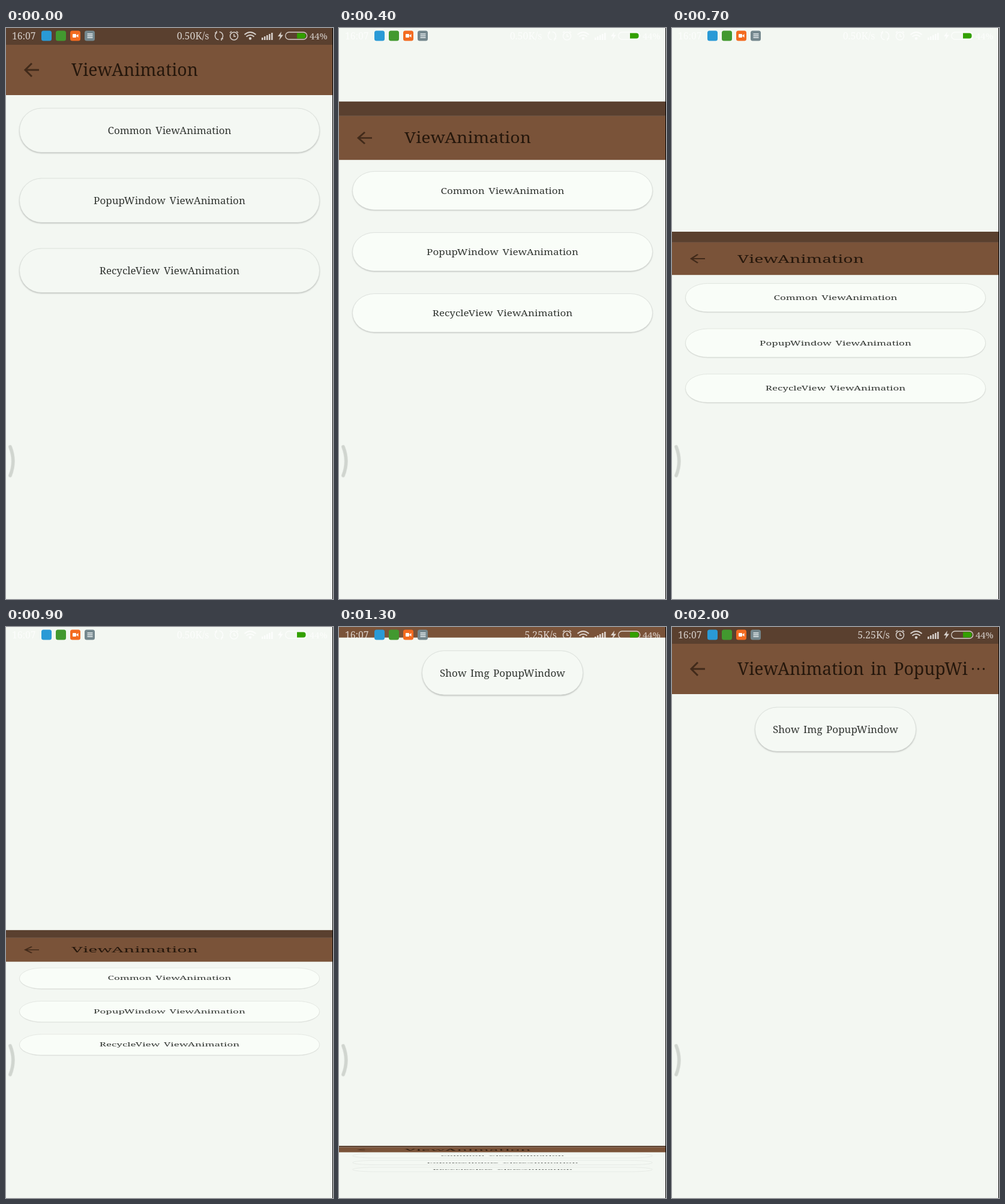
An HTML page with a canvas for the animation above (2.1 s loop, 545 by 953 pixels).

```html
<!DOCTYPE html>
<html lang="en">
<head>
<meta charset="utf-8">
<title>ViewAnimation</title>
<style>
html, body { margin: 0; width: 100%; height: 100%; overflow: hidden; background: #f3f7f2; }
canvas { display: block; }
</style>
</head>
<body>
<canvas id="stage" width="545" height="953"></canvas>
<script>
const ctx = document.getElementById('stage').getContext('2d');
const LOOP = 2100, STEP = 100, PAGE = 960;
const PAPER = '#f3f7f2', INK = 'rgba(255,255,255,.75)', TITLE = '#25170c';

// [time, linear progress] of the page change
const KEYS = [[0, 0], [400, .2325], [600, .35], [900, .517], [1100, .644], [1200, .741], [1500, .909], [1800, 1]];

function progress(time) {
  const i = KEYS.findIndex(k => k[0] > time);
  if (i < 0) return 1;
  const [t0, a] = KEYS[i - 1], [t1, b] = KEYS[i];
  const u = a + (b - a) * (time - t0) / (t1 - t0);
  return (1 - Math.cos(Math.PI * u)) / 2;
}

function rect(x, y, w, h, color) {
  ctx.fillStyle = color;
  ctx.fillRect(x, y, w, h);
}

function round(x, y, w, h, r, color) {
  ctx.beginPath();
  ctx.roundRect(x, y, w, h, r);
  ctx.fillStyle = color;
  ctx.fill();
}

function text(str, x, y, size, color, align = 'left') {
  ctx.font = `300 ${size}px "Noto Serif", "Liberation Serif", serif`;
  ctx.wordSpacing = size / 8 + 'px';
  ctx.textAlign = align;
  ctx.fillStyle = color;
  ctx.fillText(str, x, y);
}

function line(path, width, color) {
  ctx.lineWidth = width;
  ctx.strokeStyle = color;
  ctx.stroke(new Path2D(path));
}

function disc(x, y, r, color) {
  ctx.beginPath();
  ctx.arc(x, y, r, 0, 7);
  ctx.fillStyle = color;
  ctx.fill();
}

function button(label, x, y, w, fill) {
  const scale = ctx.getTransform().d; // canvas shadows ignore the transform
  ctx.save();
  ctx.shadowColor = `rgba(0,0,0,${.28 * scale})`;
  ctx.shadowBlur = 2.5 * scale;
  ctx.shadowOffsetY = 1.3 * scale;
  round(x, y, w, 73.5, 36.7, fill);
  ctx.restore();
  ctx.lineWidth = .8;
  ctx.strokeStyle = '#d9ddd8';
  ctx.stroke();
  text(label, x + w / 2, y + 43, 17, '#313531', 'center');
}

function header(title) {
  rect(0, 0, 545, PAGE, PAPER);
  rect(0, 0, 545, 28, '#5a402f');
  rect(0, 28, 545, 84, '#7a5339');
  line('M55 70H33M43 59L32 70L43 81', 3, '#412a1a');
  text(title, 109, 80, 28.4, TITLE);
}

function firstPage(fill) {
  header('ViewAnimation');
  ['Common', 'PopupWindow', 'RecycleView'].forEach((name, i) =>
    button(name + ' ViewAnimation', 22.5, 134 + 117 * i, 500, fill));
}

function secondPage() {
  header('ViewAnimation in PopupWi');
  for (let i = 0; i < 3; i++) disc(501.5 + 9 * i, 70, 1.7, TITLE);
  button('Show Img PopupWindow', 138.5, 134, 268, '#f5f9f4');
}

function statusBar(changed) {
  text('16:07', 10, 18.5, 15.7, INK);
  ['#2a9ad6', '#42992f', '#f36b20', '#74878d'].forEach((color, i) =>
    round(59 + 24 * i, 4.5, 17, 17, 3.5, color));
  round(111, 10, 6, 6, 1, '#fff');
  ctx.fillStyle = '#fff';
  ctx.fill(new Path2D('M117 13L120.5 10V16Z'));
  for (let y = 9; y < 17; y += 3) rect(135.5, y, 9, 2, '#cfd8da');

  if (changed) {
    text('5.25K/s', 363, 18.5, 16, INK, 'right');
  } else {
    text('0.50K/s', 338.5, 18.5, 16, INK, 'right');
    line('M354.5 19.5A6.5 6.5 0 0 1 351 7.9M355.5 6.5A6.5 6.5 0 0 1 359 18.1M351 5V8H348M359 21V18H362', 1.5, INK);
  }
  // alarm, wifi, signal, charging bolt
  line('M386.5 13.5A6.5 6.5 0 1 1 373.5 13.5A6.5 6.5 0 1 1 386.5 13.5M380 10V14H383M373 8L376 5.5M387 8L384 5.5', 1.5, INK);
  line('M397.5 11Q407 3 416.5 11M400.5 14.5Q407 9 413.5 14.5', 2, INK);
  disc(407, 17.5, 2.2, INK);
  for (let i = 0; i < 5; i++) rect(426 + 4 * i, 16 - 2 * i, 2.6, 4 + 2 * i, INK);
  ctx.fillStyle = INK;
  ctx.fill(new Path2D('M459 6L453 14H457L455 20.5L462 11.5H458Z'));
  ctx.beginPath();
  ctx.roundRect(465.7, 7, 36, 12, 6);
  ctx.lineWidth = 1.3;
  ctx.strokeStyle = INK;
  ctx.stroke();
  round(485, 8.5, 14.5, 9, [0, 4, 4, 0], '#32a000');
  text('44%', 506, 18.5, 14.8, INK);
}

function draw(time) {
  const p = progress(time), top = PAGE * p;
  rect(0, 0, 545, 953, PAPER);
  if (p < 1) {
    ctx.save();
    ctx.translate(0, top);
    ctx.scale(1, 1 - p);
    firstPage(p > 0 && p < .7 ? '#f9fdf8' : '#f4f8f3');
    ctx.restore();
  }
  if (p > 0) {
    ctx.save();
    ctx.translate(0, top - PAGE);
    secondPage();
    ctx.restore();
  }
  statusBar(time >= 1300);

  ctx.lineCap = 'round';
  const handle = 'M7 699Q16.5 723 7 747';
  line(handle, 6.2, 'rgba(150,155,150,.25)');
  line(handle, 4.4, 'rgba(200,205,199,.6)');
  ctx.lineCap = 'butt';
  rect(544, 0, 1, 953, '#000');
}

function tick() {
  const time = performance.now() % LOOP;
  draw(Math.floor(time / STEP) * STEP);
  requestAnimationFrame(tick);
}
tick();
</script>
</body>
</html>
```
